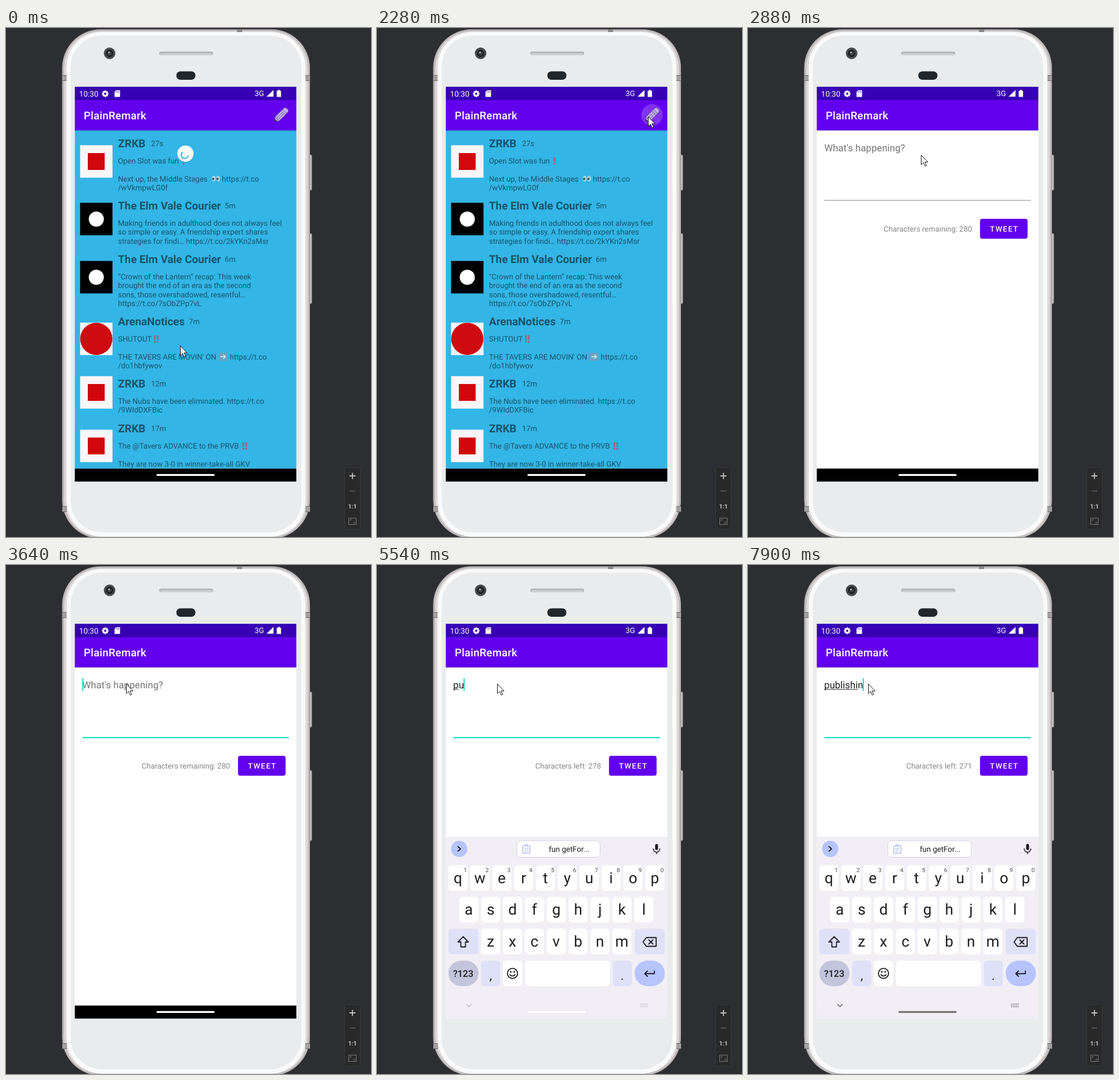
Animation of 629 by 875 pixels, one loop 8000 ms. Source, as an HTML page:

```html
<!DOCTYPE html>
<html lang="en">
<head>
<meta charset="utf-8">
<title>Compose a post</title>
<style>
  html, body { margin: 0; width: 100%; height: 100%; overflow: hidden; background: #2d2e32; }
  svg { display: block; width: 629px; height: 875px; font: 13px Roboto, sans-serif; text-rendering: geometricPrecision; }
  .line { fill: none; stroke-linecap: round; stroke-linejoin: round; }
</style>
</head>
<body>
<svg id="stage" viewBox="0 0 629 875" xmlns="http://www.w3.org/2000/svg"></svg>
<script>
const rect = (x, y, w, h, fill, r = 0, more = '') =>
  `<rect x="${x}" y="${y}" width="${w}" height="${h}" rx="${r}" fill="${fill}" ${more}/>`;
const circle = (x, y, r, fill, more = '') => `<circle cx="${x}" cy="${y}" r="${r}" fill="${fill}" ${more}/>`;
const text = (x, y, s, fill, more = '') => `<text x="${x}" y="${y}" fill="${fill}" ${more}>${s}</text>`;
const path = (d, fill, more = '') => `<path d="${d}" fill="${fill}" ${more}/>`;
const line = (d, color, width = 1.5, more = '') =>
  `<path class="line" d="${d}" stroke="${color}" stroke-width="${width}" ${more}/>`;
const group = (id, body, more = '') => `<g id="${id}" ${more}>${body}</g>`;
// full-width band of the phone's screen
const band = (top, bottom, fill, more) => rect(118.6, top, 381.7, bottom - top, fill, 0, more);

const PURPLE = '#6200ee', TEAL = '#03dac5', SKY = '#33b5e5', INK = 'rgba(0,0,0,.54)', DARK = '#1d1c20';
const MARK = 'rgba(222,46,66,.58)';

function phone() {
  const antennas = [[97, 81], [516, 81], [97, 822], [516, 822]]
    .map(([x, y]) => rect(x, y, 8, 10, '#a3a09f') + rect(x, y, 8, 1, '#6f6d6d') + rect(x, y + 9, 8, 1, '#6f6d6d'));
  const buttons = [[218, 61], [353, 121]]
    .map(([y, h]) => rect(521, y, 6, h, '#cbc6c6', 2, 'stroke="#77757a" stroke-width="1"'));
  return buttons.join('') +
    rect(97, 2.5, 426.5, 875, '#c9c4c4', 66, 'stroke="#8b888a"') +
    rect(99.5, 4.5, 421.5, 871, '#ded9d9', 64, 'stroke="#aaa5a6" stroke-width=".8"') +
    antennas.join('') + rect(398, 2.5, 9, 5, '#8b888a') +
    rect(104.5, 7, 411.5, 867, '#fafafa', 60) +
    rect(111.5, 13, 397.5, 854, '#e9ebec', 54) +
    rect(264, 40.5, 93, 6, '#b4b6b8', 3) + rect(266, 43.5, 89, 2.5, '#cfd1d2', 1) +
    circle(178.5, 43.5, 10, '#4b4b4d') + circle(178.5, 43.5, 6.5, '#202023') +
    circle(178.5, 43.5, 3.5, '#3f4348') + circle(177.5, 42, 1.3, '#c8ccd0') +
    rect(293.5, 74.5, 33, 14.5, '#1f262c', 7.2);
}

function zoomPanel() {
  return rect(583.5, 755.5, 27, 106, '#29292a', 3, 'stroke="#38393b"') +
    line('M592.5 770h9M597 765.500v9', '#bfc0c2', 1.8) +
    line('M592.5 796h9', '#5d5e60', 1.5) +
    text(597, 825.5, '1:1', '#c4c5c7', 'font-size="10.500" font-weight="700" text-anchor="middle"') +
    rect(590.5, 842.5, 13, 11, 'none', 0, 'stroke="#77787a"') +
    line('M593 847v-2h2.500M601 849v2h-2.500', '#77787a', 1);
}

function bars() {
  const teeth = [0, 45, 90, 135].map(a => rect(169.6, 107.3, 2.8, 11.4, '#fff', .5, `transform="rotate(${a} 171 113)"`));
  return band(101, 124, '#3700b3') + band(124, 176, PURPLE) +
    text(126, 117.6, '10:30', '#fff', 'font-size="13.300"') +
    teeth.join('') + circle(171, 113, 4.3, '#fff') + circle(171, 113, 1.9, '#3700b3') +
    path('M190 107h6.500v11.500h-9.500v-8.500z', '#fff') +
    line('M190.500 108.800v1.800M192.500 108.800v1.800M194.500 108.800v1.800', '#3700b3', .8) +
    text(428.5, 117.4, '3G', '#fff', 'font-size="13"') +
    path('M461 106.500v11.500h-12z', '#fff') +
    path('M468.500 106.500h3.500v1.500h2v10.500h-7.500v-10.500h2z', '#fff');
}

const bang = (x, y) => rect(x, y - 10, 3, 8.5, MARK, 1.3) + circle(x + 1.5, y + 1.2, 1.7, MARK);
const eye = x => `<ellipse cx="${x}" cy="259" rx="3.300" ry="5" fill="#b4d3dd"/>` + circle(x - 1, 259.5, 2, '#36596a');
const arrowBox = rect(367, 558, 14.5, 14, '#6aa3bf', 1.5) + line('M370 565h8M375 562l3 3-3 3', '#d8eaf2', 1.6);

// name baseline, avatar top, name, age, age x, lines of [row, x, text]
const posts = [
  [204.5, 202, 'ZRKB', '27s', 250, [[0, 193, 'Open Slot was fun'], [2, 193, 'Next up, the Middle Stages'],
    [2, 372, 'https://t.co'], [3, 193, '/wVkmpwLG0f']]],
  [311.5, 301, 'The Elm Vale Courier', '5m', 377, [[0, 193, 'Making friends in adulthood does not always feel'],
    [1, 193, 'so simple or easy. A friendship expert shares'], [2, 193, 'strategies for findi… https://t.co/2kYKn2sMsr']]],
  [403.5, 401, 'The Elm Vale Courier', '6m', 377, [[0, 193, '“Crown of the Lantern” recap: This week'],
    [1, 193, 'brought the end of an era as the second'], [2, 193, 'sons, those overshadowed, resentful…'],
    [3, 193, 'https://t.co/7sObZPp7vL']]],
  [510.5, 507, 'ArenaNotices', '7m', 315, [[0, 193, 'SHUTOUT'], [2, 193, 'THE TAVERS ARE MOVIN\' ON'],
    [2, 385.5, 'https://t.co'], [3, 193, '/do1hbfywov']]],
  [617.5, 599, 'ZRKB', '12m', 250, [[0, 193, 'The Nubs have been eliminated. https://t.co'], [1, 193, '/9WIdDXFBic']]],
  [694.5, 691, 'ZRKB', '17m', 250, [[0, 193, 'The @Tavers ADVANCE to the PRVB'],
    [2, 193, 'They are now 3-0 in winner-take-all GKV']]],
];

function avatar(name, y) {
  if (name[0] === 'T') return rect(127.7, y - .5, 55.8, 55.8, '#000') + circle(155.6, y + 27.5, 13, '#fff');
  const tile = rect(127.7, y - .5, 55.8, 55.8, '#f7f7f7');
  return tile + (name[0] === 'A' ? circle(155.6, y + 27.4, 27.7, '#cf0a10') : rect(141, y + 13, 29, 29, '#d0080c'));
}

function feed() {
  const items = posts.map(([y, top, name, age, ageX, lines]) => avatar(name, top) +
    text(193, y, name, INK, 'font-size="18.800" font-weight="700"') + text(ageX, y - 2, age, INK) +
    lines.map(([row, x, s]) => text(x, y + 28.7 + row * 15.2, s, INK)).join(''));
  const pencil = path('M-16 0l6-5H11q4 0 4 3.500v3q0 3.500-4 3.500H-10z', '#c2b0e6', 'stroke="#55389a" stroke-width=".900"') +
    line('M-10-4.500v9M5-4.500v9M8.500-4.500v9M-10-1.500H5M-10 1.800H5', '#6a4da6', .9) +
    path('M-16 0l3.500-2.800v5.600z', '#352055');
  return band(176, 757.4, SKY) + items.join('') +
    bang(304.5, 232) + bang(255, 538) + bang(260, 538) + bang(407.5, 722) + bang(412.5, 722) +
    eye(358) + eye(365.5) + arrowBox +
    circle(474, 149.5, 18.5, '#fff', 'id="ripple" opacity=".2"') +
    `<g transform="translate(474 149.500) rotate(-45)">${pencil}</g>` +
    group('spinner', circle(0, 1, 14, 'rgba(0,0,0,.12)') + circle(0, 0, 14, '#fafafa') +
      line('M-5.500-2A6 6 0 1 0 4.500 4', SKY, 2));
}

function compose() {
  return band(176, 757.4, '#fff') +
    group('sheet', text(131.5, 211.7, "What's happening?", '#757575', 'id="hint" font-size="16.700"') +
      text(131.3, 211.7, '', '#212121', 'id="typed" font-size="16.700"') +
      rect(131.3, 213.3, 0, 1, '#212121', 0, 'id="under"') +
      rect(131.5, 295.7, 356, 1, '#858585', 0, 'id="rule"') +
      rect(131.5, 194.5, 1.8, 22, TEAL, 0, 'id="caret"') +
      text(386, 350.3, '', '#868686', 'id="count" text-anchor="end"') +
      rect(399.8, 328, 82, 34.3, PURPLE, 4) +
      text(417, 350.2, 'TWEET', '#fff', 'font-weight="500" letter-spacing="1.450"'));
}

function keyboard() {
  const big = 'font-size="26" text-anchor="middle"';
  const key = (x, y, w, fill = '#fff', r = 6) => rect(x, y, w, 44, fill, r);
  const letters = (row, x, y) => [...row].map((c, i) =>
    key(x + i * 37.7, y, 33) + text(x + 16.5 + i * 37.7, y + 30.5, c, DARK, big)).join('');
  const digits = [...'1234567890'].map((d, i) =>
    text(152 + i * 37.7, 527.5, d, '#45454c', 'font-size="10" text-anchor="middle"')).join('');
  const dots = [0, 1, 2].map(r => line(`M454 ${754.5 + r * 2.5}h13`, '#757479', 1.6, 'stroke-dasharray="0.300 2.500"')).join('');
  return band(467, 780, '#f1eff5') +
    circle(141.7, 488, 14, '#b6c4ff') + line('M139.500 484l4.500 4-4.500 4', DARK, 1.7) +
    rect(241, 474, 143.5, 28.5, '#fff', 6, 'stroke="#d3d3df"') +
    line('M251 483h12.500v12.500h-12.500zM255 483v-2h4.500v2M254 487h6.500M254 490h6.500M254 493h4', '#9dadee', 1.2) +
    text(296, 492.7, 'fun getFor...', DARK, 'font-size="13.200"') +
    rect(479.3, 479.5, 5, 10.5, DARK, 2.5) + line('M476 488a5.700 5.700 0 0 0 11.400 0M481.700 494v2.500', DARK, 1.6) +
    letters('qwertyuiop', 123, 516) + digits + letters('asdfghjkl', 141.7, 570.5) + letters('zxcvbnm', 179.3, 625.3) +
    key(123, 625.3, 52, '#dfe1f9') + line('M148.500 639l-9 9h5v8.500h8v-8.500h5z', DARK, 1.8) +
    key(444, 625.3, 52, '#dfe1f9') +
    line('M464 640.500h17v15h-17l-5.500-7.500zM468.500 644.500l7 7M475.500 644.500l-7 7', DARK, 1.8) +
    key(123, 680, 52, '#c3c5dc', 22) + text(148.5, 708, '?123', DARK, 'font-size="16" font-weight="500" text-anchor="middle"') +
    key(179.3, 680, 33, '#dfe1f9') + text(196, 712.5, ',', DARK, 'font-size="21" text-anchor="middle"') +
    key(217, 680, 33) + circle(233.5, 702, 8.7, 'none', `stroke="${DARK}" stroke-width="1.800"`) +
    circle(230.5, 699.5, 1.4, DARK) + circle(236.5, 699.5, 1.4, DARK) + line('M229 704a5 4.500 0 0 0 9 0', DARK, 1.6) +
    key(255, 680, 146) + key(406.2, 680, 33, '#dfe1f9') + text(422.5, 712.5, '.', DARK, 'font-size="21" text-anchor="middle"') +
    key(444, 680, 52, '#b6c4ff', 22) + line('M478 698v4.500h-16.500M466 698l-4.500 4.500 4.500 4.500', DARK, 1.8) +
    group('navIcons', line('M154.500 755.500l4 4 4-4', '#757479', 1.6) + dots);
}

const stage = document.getElementById('stage');
stage.innerHTML = rect(0, 0, 629, 875, '#2d2e32') + phone() + zoomPanel() + bars() +
  group('feed', feed()) + group('compose', compose()) +
  band(176, 177.5, 'rgba(0,0,0,.12)') +
  band(757.4, 779.7, '#000', 'id="nav"') + group('keys', keyboard()) +
  rect(259.3, 766.8, 100.2, 3.2, '#fff', 1.6, 'id="handle"') +
  text(134, 156.8, 'PlainRemark', '#fff', 'id="title" font-size="18.500" font-weight="500" letter-spacing=".230"') +
  path('M0 0V16.500l3.800-3.600 2.900 6.300 2.400-1.100-2.800-6.100H11.500z', '#fff', 'id="pointer" stroke="#000" stroke-width=".900"');

const $ = id => document.getElementById(id);
const show = (id, on) => $(id).setAttribute('display', on ? 'inline' : 'none');
const set = (id, name, value) => $(id).setAttribute(name, value);
const at = (steps, t) => steps.findLast(s => s[0] <= t);

const pointerSteps = [[0, 300, 546], [150, 303, 520], [270, 308, 474], [420, 339, 394], [820, 443, 285],
  [970, 450, 246], [1090, 457, 206], [1210, 462, 178], [1330, 466, 160], [1450, 467, 152],
  [2640, 440, 161], [2760, 378, 186], [2880, 298, 218], [3000, 244, 238],
  [3150, 231, 226], [3270, 215, 211], [3390, 207, 204]];
const slideSteps = [[0, 6.3], [2640, 2.5], [2760, 1], [2880, 0]];
const word = 'publishin';
// time, letters typed, letters underlined
const typeSteps = [[0, 0, 0], [5280, 1, 0], [5400, 2, 1], [5780, 3, 2], [6020, 4, 3], [6260, 4, 4],
  [6770, 5, 5], [7250, 6, 5], [7400, 7, 6], [7650, 8, 7], [7900, 9, 8]];
const fadeTimes = [5540, 5660, 5780, 5900, 6020, 6260, 6500, 6770, 7010, 7250].map(t => [t]);

function draw(t) {
  const [, px, py] = at(pointerSteps, t);
  set('pointer', 'transform', `translate(${px + .5} ${py + .5})`);

  const writing = t >= 2520;
  show('feed', !writing);
  show('compose', writing);
  show('spinner', t < 270);
  set('spinner', 'transform', `translate(309.300 216) scale(${t < 150 ? 1 : .5})`);
  show('ripple', t >= 2130);
  const [cx, cy, r] = t < 2280 ? [470, 151, 8.5] : [474, 149.5, 18.5];
  set('ripple', 'cx', cx);
  set('ripple', 'cy', cy);
  set('ripple', 'r', r);

  const shift = writing ? at(slideSteps, t)[1] : 0;
  set('title', 'x', 134 + shift);
  set('sheet', 'transform', `translate(${shift})`);

  const focused = t >= 3640;
  set('rule', 'fill', focused ? TEAL : '#858585');
  set('rule', 'height', focused ? 2 : 1);

  const [, n, marked] = at(typeSteps, t);
  const typed = $('typed');
  typed.textContent = word.slice(0, n);
  const width = k => writing && k ? typed.getSubStringLength(0, k) : 0;
  set('under', 'width', width(marked));
  set('caret', 'x', 131.5 + Math.max(0, width(n) - .8));
  show('caret', focused && !(t >= 4410 && t < 4910));
  show('hint', !n);
  $('count').textContent = `Characters ${n ? 'left' : 'remaining'}: ${280 - n}`;

  const keys = t >= 5540;
  show('keys', keys);
  show('nav', !keys);
  const fade = keys ? (at(fadeTimes, t)[0] - 5540) / 1710 : 0;
  set('navIcons', 'opacity', Math.min(1, .35 + fade * .9));
  const grey = Math.round(255 - 137 * fade);
  set('handle', 'fill', `rgb(${grey},${grey},${grey})`);
}

function tick() {
  draw(performance.now() % 8000);
  requestAnimationFrame(tick);
}
tick();
</script>
</body>
</html>
```
